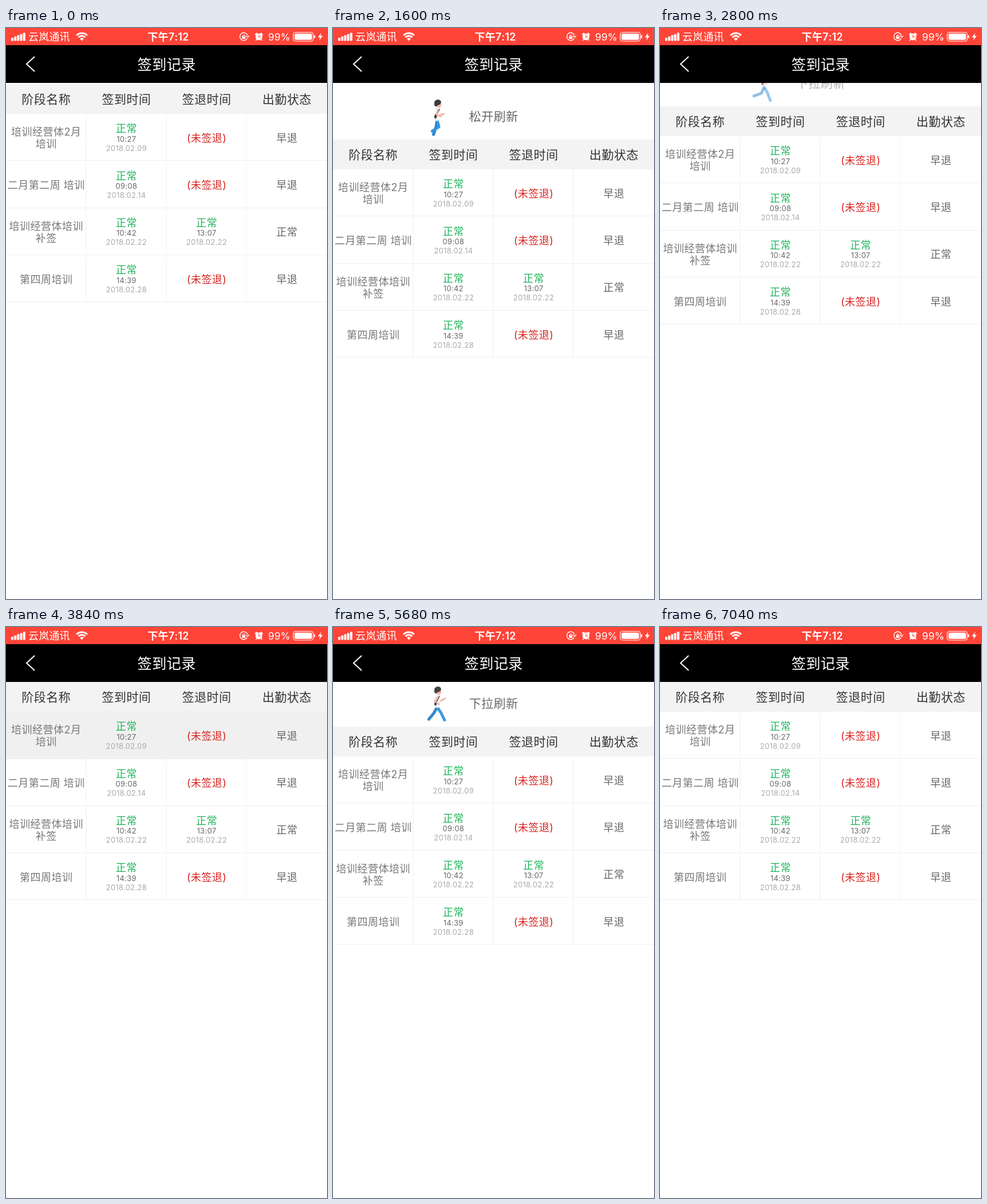
Recreate the animation shown at these times as an HTML page with a canvas. Size 561x998 px, loop 7.12 s.

```html
<!DOCTYPE html>
<html lang="zh-CN">
<head>
<meta charset="utf-8">
<title>签到记录</title>
<style>
html, body { margin: 0; width: 100%; height: 100%; overflow: hidden; background: #fff; }
canvas { display: block; width: 100%; height: 100%; }
</style>
</head>
<body>
<canvas id="stage" width="561" height="998"></canvas>
<script>
const W = 561, H = 998, LOOP = 7120, STEP = 80;
const ctx = document.getElementById('stage').getContext('2d');
const FONT = 'Inter, "Noto Sans CJK SC", "Noto Sans CJK", sans-serif';
const TOP = 96, HEAD = 52, ROW = 82.3, PULL = 81;
const COLS = [70, 210.3, 350.5, 490.8];
const GREEN = '#1fb45a', RED = '#d8231f';

// [time, table offset]
const DRAG = [
  [0, 2], [80, 1], [160, 0], [640, 0], [720, 2], [800, 7], [880, 16],
  [1280, 62], [1600, 99], [2000, 110], [2160, 116], [2240, 104], [2320, 90],
  [2400, 83], [2480, 81], [2600, 81], [2720, 67], [2800, 41], [2880, 16],
  [2960, 4], [3040, 0], [5200, 0], [5280, 3], [5360, 12], [5440, 27],
  [5680, 78], [5760, 92], [5840, 101], [5920, 89], [6000, 83], [6080, 81],
  [6240, 81], [6320, 75], [6400, 75], [6480, 56], [6560, 32], [6640, 12],
  [6720, 3], [6800, 0], [7120, 0]
];
const REFRESH = [[2200, 2640], [5880, 6300]];
// [touch start, hold, fade]
const TOUCH = [[640, 80, 80], [3840, 160, 320], [4640, 160, 320]];

const ROWS = [
  { name: ['培训经营体2月', '培训'], time: '10:27', date: '2018.02.09', state: '早退' },
  { name: ['二月第二周 培训'], time: '09:08', date: '2018.02.14', state: '早退' },
  { name: ['培训经营体培训', '补签'], time: '10:42', date: '2018.02.22', out: '13:07', state: '正常' },
  { name: ['第四周培训'], time: '14:39', date: '2018.02.28', state: '早退' }
];

function offsetAt(t) {
  let i = 1;
  while (i < DRAG.length - 1 && DRAG[i][0] < t) i++;
  const [t0, a] = DRAG[i - 1], [t1, b] = DRAG[i];
  return a + (b - a) * (t - t0) / (t1 - t0);
}

function touchAt(t) {
  for (const [start, hold, fade] of TOUCH) {
    const age = t - start;
    if (age >= 0 && age < hold + fade) return Math.min(1, 1 - (age - hold) / fade);
  }
  return 0;
}

function rect(x, y, w, h, color) {
  ctx.fillStyle = color;
  ctx.fillRect(x, y, w, h);
}

function box(x, y, w, h, r) {
  ctx.beginPath();
  ctx.roundRect(x, y, w, h, r);
}

// y is the middle of the glyphs
function text(str, x, y, size, color, { weight = 400, gap = 0, align = 'center' } = {}) {
  ctx.font = `${weight} ${size}px ${FONT}`;
  ctx.letterSpacing = gap + 'px';
  ctx.textAlign = align;
  ctx.fillStyle = color;
  const mid = /[\u4e00-\u9fff]/.test(str) ? 0.38 : 0.365;
  ctx.fillText(str, x + (align === 'center' ? gap / 2 : 0), y + size * mid);
}

function line(points, color, width) {
  ctx.strokeStyle = color;
  ctx.lineWidth = width;
  ctx.beginPath();
  points.forEach(([x, y]) => ctx.lineTo(x, y));
  ctx.stroke();
}

function arc(x, y, r, a, b, width) {
  ctx.lineWidth = width;
  ctx.beginPath();
  ctx.arc(x, y, r, a, b);
  ctx.stroke();
}

function limb(x, y, a, b, la, lb, color, width) {
  const kx = x + Math.sin(a) * la, ky = y + Math.cos(a) * la;
  line([[x, y], [kx, ky], [kx + Math.sin(b) * lb, ky + Math.cos(b) * lb]], color, width);
}

function leg(phase, color) {
  const thigh = 0.55 * Math.sin(phase) + 0.05;
  const shin = thigh - 0.15 - 1.2 * Math.max(0, Math.cos(phase));
  limb(0, 0, thigh, shin, 12, 14, color, 5);
}

function arm(phase) {
  const a = 0.6 * Math.sin(phase);
  limb(1, -18, a, a + 1.5, 9, 9, '#f5b5a5', 3);
}

function runner(x, y, phase) {
  ctx.save();
  ctx.translate(x, y);
  ctx.lineCap = ctx.lineJoin = 'round';
  arm(phase);
  leg(phase + Math.PI, '#2b83cc');
  leg(phase, '#3595df');
  line([[2, -18], [0, -3]], '#f3f3f5', 9);
  line([[4, -19], [-2, -7]], '#4a4a50', 1.5);
  line([[-2, -9], [-3, -5]], '#34343a', 4);
  arm(phase + Math.PI);
  ctx.fillStyle = '#f5b9a9';
  ctx.beginPath();
  ctx.ellipse(3, -27, 4.5, 5.5, 0, 0, 7);
  ctx.fill();
  ctx.fillStyle = '#3b3b3f';
  ctx.beginPath();
  ctx.ellipse(1, -31, 6, 4.8, -0.25, 0, 7);
  ctx.ellipse(-2, -28, 3, 4, 0, 0, 7);
  ctx.fill();
  ctx.restore();
}

function refresher(t, off) {
  const busy = REFRESH.some(([a, b]) => t >= a && t < b);
  const ready = !busy && off >= PULL;
  const pull = Math.min(1, off / PULL);
  const phase = busy || ready
    ? 0.4 + (t - 1600) / STEP * 1.05
    : Math.PI / 2 + (pull - 0.96) * 4 * Math.PI;
  ctx.globalAlpha = busy ? 1 : pull;
  runner(182, TOP + off - 34, phase);
  const label = busy ? '正在刷新' : ready ? '松开刷新' : '下拉刷新';
  text(label, 280.5, TOP + off - 40.5, 21, '#666', { weight: 500, gap: 0.5 });
  ctx.globalAlpha = 1;
}

function stamp(x, y, time, date) {
  text('正常', x, y + 25.5, 18, GREEN, { gap: 0.5 });
  text(time, x, y + 44, 13, '#666', { gap: 0.3 });
  text(date, x, y + 60, 13, '#aaa', { gap: 0.3 });
}

function table(t, off) {
  const y0 = TOP + off;
  rect(0, y0, W, HEAD, '#f4f3f3');
  ['阶段名称', '签到时间', '签退时间', '出勤状态'].forEach((s, i) =>
    text(s, COLS[i], y0 + 26.5, 21, '#333', { gap: 0.5 }));

  const top = y0 + HEAD;
  for (let i = 1; i < 4; i++) rect(i * 140 - 0.5, top, 1, ROW * 4, '#f0f0f0');
  const touch = touchAt(t);
  if (touch) {
    ctx.globalAlpha = touch;
    rect(0, top, W, ROW + 0.7, '#f1f0f0');
    ctx.globalAlpha = 1;
  }
  ROWS.forEach((row, i) => {
    const y = top + i * ROW;
    rect(0, Math.round(y + ROW) - 1, W, 1, '#f0f0f0');
    row.name.forEach((s, k) =>
      text(s, COLS[0], y + 42 + (k - (row.name.length - 1) / 2) * 21, 18, '#777', { gap: 0.5 }));
    stamp(COLS[1], y, row.time, row.date);
    if (row.out) stamp(COLS[2], y, row.out, row.date);
    else text('(未签退)', COLS[2], y + 42, 18, RED, { gap: 0.5 });
    text(row.state, COLS[3], y + 42, 18, '#666', { gap: 0.5 });
  });
}

function statusBar() {
  rect(0, 0, W, 30, '#ff4438');
  for (let i = 0; i < 5; i++) {
    const h = 5.5 + i * 2.2;
    ctx.fillStyle = '#fff';
    box(9 + i * 5.2, 22.5 - h, 4, h, 1);
    ctx.fill();
  }
  text('云岚通讯', 39, 15.5, 18, '#fff', { align: 'left', gap: 0.2 });

  ctx.strokeStyle = '#fff';
  ctx.lineCap = 'butt';
  const up = -Math.PI / 2;
  arc(132.5, 22, 13, up - 0.8, up + 0.8, 3);
  arc(132.5, 22, 8.3, up - 0.8, up + 0.8, 3);
  ctx.beginPath();
  ctx.moveTo(132.5, 22.5);
  ctx.arc(132.5, 22, 4.8, up - 0.8, up + 0.8);
  ctx.fill();

  text('下午7:12', 283.5, 15.5, 18, '#fff', { weight: 600, gap: 0.2 });

  // rotation lock
  arc(415.5, 15, 6.8, 0.5, 6, 1.4);
  line([[419.5, 13.5], [422.3, 16.5], [425, 13.5]], '#fff', 1.3);
  rect(412.5, 14.5, 6, 4.5, '#fff');
  arc(415.5, 14.3, 1.9, Math.PI, 0, 1.2);

  // alarm
  ctx.beginPath();
  ctx.arc(442, 15.5, 6, 0, 7);
  ctx.fill();
  line([[435.3, 12], [439, 8.7]], '#fff', 2.2);
  line([[445, 8.7], [448.7, 12]], '#fff', 2.2);
  line([[438, 20], [436.5, 22]], '#fff', 1.5);
  line([[446, 20], [447.5, 22]], '#fff', 1.5);
  line([[442, 11.5], [442, 15.8], [445, 15.8]], '#ff4438', 1.2);

  text('99%', 477.5, 15.5, 17.5, '#fff');

  ctx.strokeStyle = '#fff';
  ctx.lineWidth = 1.2;
  box(502, 7.5, 35, 15.5, 4);
  ctx.stroke();
  box(504.3, 9.8, 30.4, 10.9, 2);
  ctx.fill();
  box(538.3, 12.5, 2, 5.5, 1);
  ctx.fill();
  ctx.beginPath();
  [[551, 8.5], [545, 16.2], [548.8, 16.2], [547.3, 22], [553.5, 13.8], [549.6, 13.8]]
    .forEach(([x, y]) => ctx.lineTo(x, y));
  ctx.fill();
}

function navBar() {
  rect(0, 30, W, 66, '#000');
  ctx.lineJoin = 'miter';
  line([[50, 50], [36, 63], [50, 76]], '#fff', 2);
  text('签到记录', 280.5, 63, 25.2, '#fff', { weight: 500, gap: 0.3 });
}

function draw(now) {
  const t = Math.floor(now % LOOP / STEP) * STEP;
  const off = offsetAt(t);
  rect(0, 0, W, H, '#fff');
  if (off > 2) refresher(t, off);
  table(t, off);
  navBar();
  statusBar();
}

let start;
function tick(now) {
  start ??= now;
  draw(Math.max(0, now - start));
  requestAnimationFrame(tick);
}
requestAnimationFrame(tick);
</script>
</body>
</html>
```
